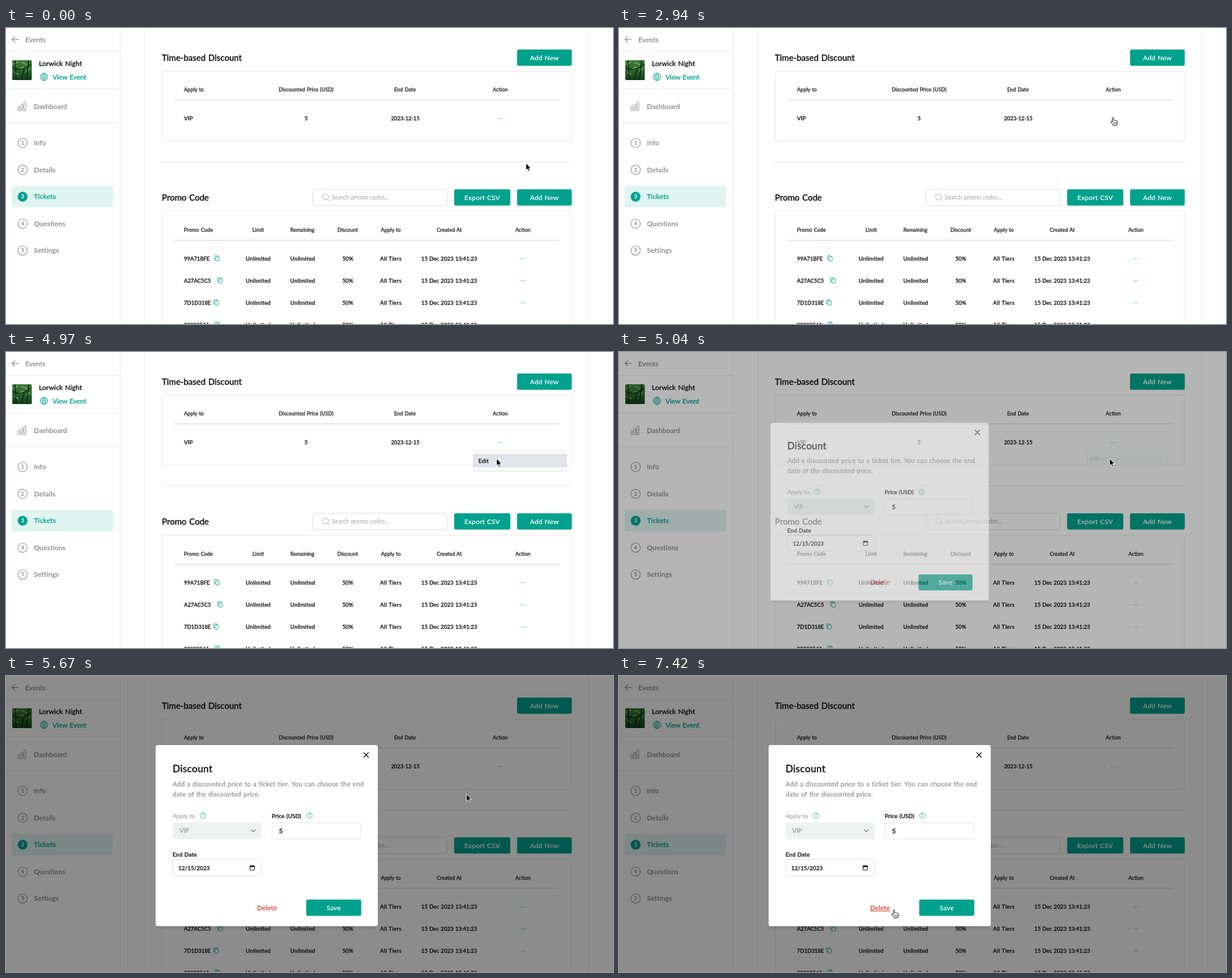
An HTML page for the animation above (8 s loop, 1071 by 523 pixels).

```html
<!DOCTYPE html>
<html lang="en">
<head>
<meta charset="utf-8">
<title>Ticket discounts</title>
<style>
  html, body { margin: 0; width: 100%; height: 100%; overflow: hidden; background: #fff; }
  svg { display: block; width: 100%; height: 100%; }
  text { font-family: Lato, Inter, sans-serif; word-spacing: .06em; white-space: pre; stroke-width: .28px; }
</style>
</head>
<body>
<svg id="stage" viewBox="0 0 1071 523"></svg>
<script>
const TEAL = '#00a28d', GREY = '#8e8e8e', INK = '#0c0c0c', EDGE = '#e6e6e6';
const STEP = 70, LOOP = 8000;

// Drawing helpers; a hairline stroke gives text a medium weight
const text = (x, y, s, size, o = {}) =>
  `<text x="${x}" y="${y}" font-size="${size}" fill="${o.fill || INK}" font-weight="${o.w || 500}"` +
  ` stroke="${o.w ? 'none' : o.fill || INK}"` +
  ` letter-spacing="${o.ls || 0}" text-anchor="${o.mid ? 'middle' : 'start'}">${s}</text>`;
const rect = (x, y, w, h, fill, stroke = 'none', r = 3, extra = '') =>
  `<rect x="${x}" y="${y}" width="${w}" height="${h}" rx="${r}" fill="${fill}" stroke="${stroke}" ${extra}/>`;
const path = (d, stroke, w = 1, fill = 'none') =>
  `<path d="${d}" stroke="${stroke}" stroke-width="${w}" fill="${fill}" stroke-linecap="round" stroke-linejoin="round"/>`;
const circle = (x, y, r, fill, stroke = 'none', w = 1) =>
  `<circle cx="${x}" cy="${y}" r="${r}" fill="${fill}" stroke="${stroke}" stroke-width="${w}"/>`;
const rule = (x1, y, x2, color = '#e9e9e9', w = 1) => path(`M${x1} ${y}H${x2}`, color, w);
const button = (x, y, w, label) =>
  rect(x - .3, y, w + .6, 28.8, TEAL, 'none', 3) +
  text(x + w / 2, y + 18.7, label, 12, { fill: '#fff', w: 600, mid: 1, ls: .1 });
const dots = (x, y) => [-3.3, 0, 3.3].map(d => circle(x + d, y, .75, TEAL)).join('');
const head = (x, y, s, mid = 1) => text(x, y, s, 9.1, { mid, fill: '#222', ls: .08 });
const cell = (x, y, s, ls = 0) => text(x, y, s, 9.7, { mid: 1, ls });
const copyIcon = (x, y) =>
  path(`M${x - 2} ${y + 2.4}H${x - 4}V${y - 4.6}H${x + 2}V${y - 3}`, TEAL, .9) +
  rect(x - 1.8, y - 2.7, 6, 7.4, '#fff', TEAL, 1, 'stroke-width=".9"');
const help = (x, y) => circle(x, y, 4.9, 'none', TEAL, .8) +
  text(x, y + 2.8, '?', 7.8, { fill: TEAL, mid: 1, w: 400 });

function photo() {
  return `<defs><linearGradient id="leaf" x2="0" y2="1">
    <stop offset="0" stop-color="#3d7a3c"/><stop offset=".45" stop-color="#2c6a2d"/>
    <stop offset="1" stop-color="#123c1b"/></linearGradient></defs>` +
    rect(11, 57, 34.5, 35, 'url(#leaf)', 'none', 2) +
    path('M13 64L21 60M28 61L37 65M24 72L31 69M36 76L42 72M15 78L21 82', '#6daa55', 2) +
    path('M16 58L18 91M40 58L36 91M12 70Q27 78 44 64M27 91L32 73', '#0c2411', 1.6);
}

function sidebar() {
  const items = ['Info', 'Details', 'Tickets', 'Questions', 'Settings'];
  const bars = [[21, 138.5], [26.3, 135], [31.6, 130.5]]
    .map(([x, y]) => rect(x, y, 3.4, 143.5 - y, 'none', GREY, .8)).join('');
  const nav = items.map((s, i) => {
    const y = 203 + i * 47.55, on = i === 2;
    return (on ? rect(10, 279, 179, 38, '#e0f4f1') : '') +
      circle(29.3, y, 8.2, on ? TEAL : 'none', on ? TEAL : GREY, 1.1) +
      text(29.3, y + 3.2, i + 1, 9, { fill: on ? '#fff' : GREY, mid: 1 }) +
      text(49.3, y + 4.2, s, 12.1, { fill: on ? TEAL : GREY, ls: .15 });
  }).join('');
  return path('M201.5 0V523', EDGE) + [41.5, 107.5, 167.5].map(y => rule(0, y, 201)).join('') +
    path('M22 20.3H10.8M15.8 15.2L10.6 20.3L15.8 25.4', GREY, 1.2) +
    text(34, 24.8, 'Events', 12, { fill: GREY, ls: .1 }) + photo() +
    text(58, 67.3, 'Lorwick Night', 12, { ls: .15 }) +
    circle(67, 86.3, 6.6, 'none', TEAL, .9) +
    `<ellipse cx="67" cy="86.3" rx="3" ry="6.6" fill="none" stroke="${TEAL}" stroke-width=".8"/>` +
    path('M60.5 86.3H73.5M67 79.7V92.9M61.4 83H72.6M61.4 89.6H72.6', TEAL, .7) +
    text(82, 91, 'View Event', 11.9, { fill: TEAL }) +
    bars + rule(20.5, 145.8, 35.5, GREY) +
    text(49, 142.5, 'Dashboard', 12.1, { fill: GREY, ls: .1 }) + nav;
}

function tables() {
  const cols = [[445, 'Limit'], [523, 'Remaining'], [603, 'Discount'], [679, 'Apply to'], [782, 'Created At'], [912, 'Action']];
  const codes = [['99A71BFE', 372], ['A27AC5C5', 377.5], ['7D1D318E', 370.5], ['0890854A', 373]];
  const rows = codes.map(([code, x], i) => {
    const y = 411 + i * 39;
    return text(314, y, code, 9.5) + copyIcon(x, y - 4) +
      cell(445, y, 'Unlimited', .3) + cell(523.5, y, 'Unlimited', .3) + cell(603, y, '50%') +
      cell(679, y, 'All Tiers', .35) + cell(782, y, '15 Dec 2023 13:41:23') + dots(912, y - 3.2);
  }).join('');
  return path('M245 0V523M1028 0V523', EDGE) +
    text(275, 58, 'Time-based Discount', 15) + button(902, 38, 96, 'Add New') +
    rect(275.5, 76.5, 722, 123.5, '#fff', EDGE) +
    head(314, 112.3, 'Apply to', 0) + head(529.5, 112.3, 'Discounted Price (USD)') +
    head(704, 112.3, 'End Date') + head(872, 112.3, 'Action') + rule(297, 127, 976, '#dedede', 1.4) +
    text(314, 163, 'VIP', 9.9) + cell(529.5, 163, '5') + text(704.5, 163, '2023-12-15', 9.3, { mid: 1 }) +
    `<g id="more">${dots(872, 160)}</g>` + rule(275, 236.5, 998, '#e4e4e4') +
    text(275, 305, 'Promo Code', 15) +
    rect(541.5, 285, 236.5, 29, '#fff', '#d9d9d9') +
    circle(563.8, 298.5, 5.2, 'none', '#aaa') + path('M567.6 302.4L571 305.8', '#aaa') +
    text(574.5, 303.4, 'Search promo codes...', 10.5, { fill: '#a2a2a2', w: 400 }) +
    button(791, 285, 98.5, 'Export CSV') + button(902, 285, 96, 'Add New') +
    rect(275.5, 323.5, 722, 260, '#fff', EDGE) + head(314, 360, 'Promo Code', 0) +
    cols.map(([x, s]) => head(x, 360, s)).join('') + rule(297, 375, 976, '#dedede', 1.4) + rows;
}

const menu = () => `<g id="menu">` +
  rect(824, 174.5, 166, 37, 'rgba(0,0,0,.05)', 'none', 4) +
  rect(824.5, 174, 165, 36, '#fff', '#e3e5e8', 3) +
  rect(825, 180, 164, 24, '#e1e5eb', 'none', 0, 'id="hover"') +
  text(833.5, 195.6, 'Edit', 10.2, { ls: .2 }) + '</g>';

function dialog() {
  return '<g id="dialog">' + rect(266, 126, 388, 322, 'rgba(0,0,0,.06)', 'none', 6) +
    rect(264, 122, 392, 320, '#fff', 'none', 4) +
    path('M631.4 135.5L639.4 143.5M639.4 135.5L631.4 143.5', INK, 1.4) +
    text(294, 169.6, 'Discount', 17.3, { ls: .3 }) +
    text(294, 194.6, 'Add a discounted price to a ticket tier. You can choose the end', 11.6, { fill: '#999', ls: .2 }) +
    text(294, 212.6, 'date of the discounted price.', 11.6, { fill: '#999', ls: .2 }) +
    text(294, 250.6, 'Apply to', 10.3, { fill: '#aaa', ls: .1 }) + help(347.5, 246.6) +
    text(469, 250.6, 'Price (USD)', 10.2) + help(535.5, 246.6) +
    rect(294, 259, 157, 29, '#eff1f1', 'none', 3) +
    text(306, 277.3, 'VIP', 10.5, { fill: '#999' }) + path('M432.8 271.6L436.3 275.2L439.8 271.6', '#666', 1.1) +
    rect(469.5, 259.3, 156.5, 28.7, '#fff', '#e4e4e4', 3, 'id="price"') + text(481.6, 277.8, '5', 12) +
    text(294, 319.3, 'End Date', 10.2, { ls: .1 }) + rect(294.3, 324.2, 156.5, 29, '#fff', '#dcdcdc') +
    text(304, 342.8, '12/15/2023', 10) +
    rect(430.6, 335.5, 7.8, 7.4, 'none', INK, .8) + rect(430.2, 335, 8.6, 2.4, INK, 'none', .5) +
    path('M432.5 334.3V335M436.5 334.3V335', INK) +
    text(460.5, 413.8, 'Delete', 11.8, { fill: '#d4503f', mid: 1, ls: .05 }) +
    `<g id="underline">${rule(443.5, 415.6, 478, '#d4503f', .9)}</g>` +
    button(530, 395, 96.5, 'Save') + '</g>';
}

const cursors = () => '<circle id="ripple" r="27.5" fill="#808080" fill-opacity=".25"/>' +
  `<g id="arrow">${path('M0 0V12.4L2.9 9.8L5 14.5L7 13.6L5 9.1H8.7Z', '#fff', 1, '#000')}</g>` +
  `<g id="hand"><g transform="translate(-4.6 -.5)">` +
  path('M3.5 8.6V1.7Q3.5 .5 4.6 .5T5.7 1.7V5.6Q6.8 4.8 7.9 5.8Q9 5.2 10 6.2Q12.3 5.8 12.4 8V10.5Q12.2 12.3 11 14.7H5Q4.4 12.4 1 9.2Q.4 7.6 1.6 7.3Q2.6 7.4 3.5 8.6Z', '#111', 1, '#fff') +
  path('M6.2 9.5V12.2M8.2 9.5V12.2M10.2 9.5V12.2', '#111', .8) + '</g></g>' +
  `<g id="beam">${path('M-2 -7Q0 -7 0 -5.5Q0 -7 2 -7M0 -5.5V5.5M-2 7Q0 7 0 5.5Q0 7 2 7', '#222')}</g>`;

document.getElementById('stage').innerHTML = sidebar() + tables() + menu() +
  rect(0, 0, 1071, 523, '#000', 'none', 0, 'id="shade"') + dialog() + cursors();

const el = {};
document.querySelectorAll('[id]').forEach(n => el[n.id] = n);

// Pointer keys: time, x, y, slope on leaving the previous key, slope on arrival
const KEYS = [
  [1400, 917.5, 239], [2240, 875.5, 188.5, .3, .7], [2800, 872, 159, 1, .2], [2870, 872, 159],
  [2940, 871.5, 158], [3920, 871.5, 158], [4760, 865.5, 188.5, .2, .2], [5460, 865.5, 188.5],
  [6300, 557.5, 306.5, .3, .55], [6370, 542.5, 318.5, 1, 1], [7140, 487, 410, 1.4, .3],
  [7210, 486.5, 409.5], [7280, 486.5, 409.5], [7350, 485.5, 412], [7420, 485.2, 413.3]
];
// Dialog steps: time, shade, scale, opacity
const OPEN = [[5040, .29, .982, .55], [5110, .4, .995, .92], [5180, .44, .999, .985], [5250, .45, 1, 1]];

function pointer(t) {
  const i = KEYS.findIndex(k => k[0] > t);
  if (i === 0) return KEYS[0].slice(1, 3);
  if (i < 0) return KEYS[KEYS.length - 1].slice(1, 3);
  const [t0, x0, y0] = KEYS[i - 1], [t1, x1, y1, a = 1, b = 1] = KEYS[i];
  const u = (t - t0) / (t1 - t0);
  const e = ((a + b - 2) * u + 3 - 2 * a - b) * u * u + a * u;
  return [x0 + (x1 - x0) * e, y0 + (y1 - y0) * e];
}

const show = (n, on) => n.setAttribute('visibility', on ? 'visible' : 'hidden');
const zoom = (n, x, y, s, alpha) => {
  n.setAttribute('transform', `translate(${x} ${y}) scale(${s}) translate(${-x} ${-y})`);
  n.setAttribute('opacity', alpha);
};

function draw(t) {
  const [x, y] = pointer(t);
  const open = t >= 5040;
  const onDots = !open && Math.abs(x - 872) < 12 && y < 173;
  const onDelete = open && y > 398 && x < 500;
  const onPrice = open && x > 469 && x < 626 && y > 259 && y < 289;
  const kind = onDots || onDelete ? 'hand' : onPrice ? 'beam' : 'arrow';
  for (const k of ['arrow', 'hand', 'beam']) {
    show(el[k], k === kind);
    el[k].setAttribute('transform', `translate(${x} ${y})`);
  }
  show(el.more, !onDots);
  show(el.underline, onDelete);
  el.price.setAttribute('stroke', onPrice ? '#b4b9b9' : '#e4e4e4');

  show(el.ripple, (t >= 3220 && t < 3430) || (t >= 4760 && t < 4970));
  el.ripple.setAttribute('cx', x);
  el.ripple.setAttribute('cy', y);

  const u = Math.max(0, Math.min(1, (t - 3360) / 350));
  const grow = 1 - (1 - u) ** 2;
  if (!open) zoom(el.menu, 824, 174, .8 + .2 * grow, grow);
  else zoom(el.menu, 824, 174, .82, t < 5110 ? .18 : 0);
  show(el.hover, t >= 4830);

  const [, shade, scale, alpha] = OPEN.filter(s => s[0] <= t).pop() || [0, 0, 1, 0];
  el.shade.setAttribute('opacity', shade);
  zoom(el.dialog, 460, 282, scale, alpha);
}

const start = performance.now();
function tick() {
  const t = (performance.now() - start) % LOOP;
  draw(Math.floor(t / STEP) * STEP);
  requestAnimationFrame(tick);
}
tick();
</script>
</body>
</html>
```
